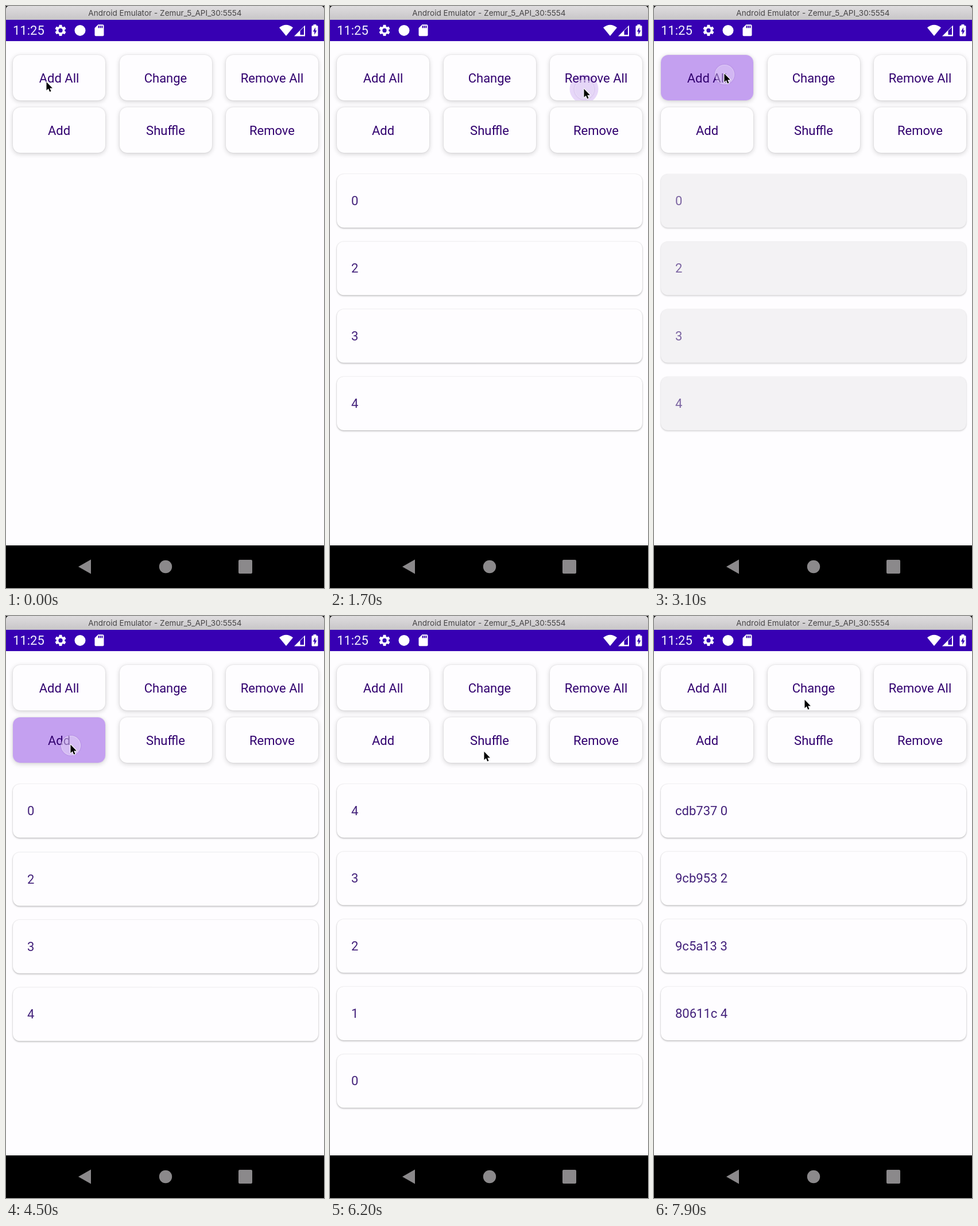
Animation of 554x1011 px, one loop 8000 ms. Source, as an HTML page:

```html
<!DOCTYPE html>
<html lang="en">
<head>
<meta charset="utf-8">
<title>List animations</title>
<style>
html, body { margin: 0; width: 100%; height: 100%; overflow: hidden; background: #000; }
#stage { position: relative; width: 554px; height: 1011px; overflow: hidden; background: #000; font: 22px Roboto, sans-serif; }
#stage > * { position: absolute; }
#title { left: 0; top: 0; width: 554px; height: 24px; border-radius: 5px 5px 0 0; background: linear-gradient(#dedcde, #c8c6c8);
  font: 13.6px/25px Inter, sans-serif; color: #464446; text-align: center; white-space: nowrap; }
#status { left: 0; top: 23.5px; width: 554px; height: 37.5px; background: #3700b3; }
#clock { left: 12px; top: 23px; line-height: 40px; color: #f3effc; }
#page { left: 0; top: 61px; width: 554px; height: 876px; background: #fefdff; }
#icons, #pointer { left: 0; top: 0; }
.button { width: 161px; height: 79px; border-radius: 13px; background: #fefdff; overflow: hidden; color: #31006f;
  text-align: center; line-height: 82px; box-shadow: 0 2px 9px rgba(0,0,0,.18), 0 0 2px rgba(0,0,0,.13); }
.button span { position: relative; }
.ripple { position: absolute; inset: 0; background: #c4a0f0; opacity: 0; }
.card { left: 12px; top: 292px; width: 532px; height: 92.5px; border-radius: 12px; line-height: 94.5px; color: #42207a; }
.card span { position: absolute; left: 25px; white-space: pre; }
#dot { width: 32px; height: 32px; margin: -17px; border-radius: 50%; background: rgba(228,214,246,.55);
  border: 1px solid rgba(240,230,250,.6); box-shadow: 0 0 3px rgba(70,30,110,.22); }
</style>
</head>
<body>
<div id="stage">
  <div id="page"></div>
  <div id="title">Android Emulator - Zemur_5_API_30:5554</div>
  <div id="status"></div>
  <div id="clock">11:25</div>
  <svg id="icons" width="554" height="1011" fill="#fff">
    <path transform="translate(83 30.4)" d="M19.14 12.94c.04-.3.06-.61.06-.94 0-.32-.02-.64-.07-.94l2.03-1.58c.18-.14.23-.41.12-.61l-1.92-3.32c-.12-.22-.37-.29-.59-.22l-2.39.96c-.5-.38-1.03-.7-1.62-.94l-.36-2.54c-.04-.24-.24-.41-.48-.41h-3.84c-.24 0-.43.17-.47.41l-.36 2.54c-.59.24-1.13.57-1.62.94l-2.39-.96c-.22-.08-.47 0-.59.22L2.74 8.87c-.12.21-.08.47.12.61l2.03 1.58c-.05.3-.09.63-.09.94s.02.64.07.94l-2.03 1.58c-.18.14-.23.41-.12.61l1.92 3.32c.12.22.37.29.59.22l2.39-.96c.5.38 1.03.7 1.62.94l.36 2.54c.05.24.24.41.48.41h3.84c.24 0 .44-.17.47-.41l.36-2.54c.59-.24 1.13-.56 1.62-.94l2.39.96c.22.08.47 0 .59-.22l1.92-3.32c.12-.22.07-.47-.12-.61zM12 15.6A3.6 3.6 0 1 1 12 8.4a3.6 3.6 0 0 1 0 7.2z"/>
    <circle cx="129" cy="42.4" r="9.5"/>
    <path transform="translate(150.5 30.2)" d="M18 2h-8L4 8v12c0 1.1.9 2 2 2h12c1.1 0 2-.9 2-2V4c0-1.1-.9-2-2-2zm-6 6h-2V4h2zm3 0h-2V4h2zm3 0h-2V4h2z"/>
    <path d="M488 52L476 37.5Q488 28 500 37.5Z"/>
    <path d="M502 52.5L521 33.5V52.5Z"/>
    <path d="M512.5 43L519 36.5V50H512.5Z" fill="#3700b3"/>
    <path d="M535.5 32h5v2h1.5q1.5 0 1.5 1.5v15.5q0 1.5-1.5 1.5h-8q-1.5 0-1.5-1.5v-15.5q0-1.5 1.5-1.5h1.5z"/>
    <path d="M539 37L534.8 44.5H537.3V50L541.5 42.5H539Z" fill="#3700b3"/>
    <g fill="#8b898b">
      <path d="M126 974L148 961.5V986.5Z"/>
      <circle cx="278" cy="974" r="11.2"/>
      <rect x="405" y="962" width="24" height="24" rx="2"/>
    </g>
  </svg>
  <div id="dot"></div>
  <svg id="pointer" width="14" height="22" overflow="visible">
    <path d="M0 0V14.5L3.4 11.5L5.7 17L8 16L5.7 10.7H10.4Z" stroke="#fff" stroke-width="2" paint-order="stroke" stroke-linejoin="round"/>
  </svg>
</div>
<script>
const LOOP = 8000, FADE = 120, MOVE = 250, ROW = 117.33;
const $ = id => document.getElementById(id);
const clamp = v => Math.max(0, Math.min(1, v));
const span = (t, start, length) => clamp((t - start) / length);
const ease = p => .5 - .5 * Math.cos(Math.PI * p);
const mix = (a, b, p) => a + (b - a) * p;

function add(parent, tag, cls, text = '') {
  const el = document.createElement(tag);
  el.className = cls;
  el.textContent = text;
  return parent.appendChild(el);
}

// Pointer moves: start, end, x, y, upward bow
const moves = [
  [-1, 0, 70.5, 132, 0],
  [950, 1480, 442.5, 144, 103],
  [2250, 2800, 122.5, 117.5, 0],
  [3450, 3900, 112.5, 223.5, 0],
  [5250, 5600, 268.5, 235.5, 0],
  [6850, 7200, 262.5, 145.5, 0]
];
// Taps: time, button index
const taps = [[490, 0], [1680, 2], [2870, 0], [4290, 3], [5650, 4], [6290, 4], [7300, 1]];
// List updates: time, order of items, whether labels change
const updates = [
  [-1000, ''],
  [640, '0234'],
  [1830, ''],
  [3020, '0234'],
  [4485, '01234'],
  [5780, '43210'],
  [6430, '20413'],
  [7440, '0234', true]
];
const prefixes = ['cdb737', '', '9cb953', '9c5a13', '80611c'];

const stage = $('stage');
const buttons = ['Add All', 'Change', 'Remove All', 'Add', 'Shuffle', 'Remove'].map((label, i) => {
  const el = add(stage, 'div', 'button');
  const x = 12 + i % 3 * 185.5, y = i < 3 ? 85 : 176;
  el.style.left = x + 'px';
  el.style.top = y + 'px';
  const ripple = add(el, 'div', 'ripple');
  add(el, 'span', '', label);
  return { x, y, ripple };
});
const cards = prefixes.map((prefix, id) => {
  const el = add(stage, 'div', 'card');
  return { el, plain: add(el, 'span', '', id), changed: add(el, 'span', '', prefix + ' ' + id) };
});
stage.append($('dot'), $('pointer'));

function pointerAt(t) {
  let [, , x, y] = moves[0];
  for (const [start, end, nx, ny, bow] of moves) {
    if (t < start) break;
    const p = ease(span(t, start, end - start));
    x = mix(x, nx, p);
    y = mix(y, ny, p) - bow * Math.sin(Math.PI * p);
  }
  return [x, y];
}

function drawTaps(t, x, y) {
  let dot = 0;
  buttons.forEach(b => b.ripple.style.opacity = 0);
  for (const [time, index] of taps) {
    const e = t - time;
    if (e < 0 || e > 440) continue;
    const { ripple, x: bx, y: by } = buttons[index];
    const r = mix(20, 170, ease(span(e, 0, 180)));
    ripple.style.opacity = span(e, -10, 75) * (1 - span(e, 250, 190));
    ripple.style.clipPath = `circle(${r}px at ${x - bx}px ${y - by}px)`;
    dot = 1 - span(e, 200, 140);
  }
  $('dot').style.opacity = dot;
  $('dot').style.left = x + 'px';
  $('dot').style.top = y + 1 + 'px';
}

// Removals first, then moves and label changes, then insertions.
function drawCards(t) {
  const n = updates.findLastIndex(u => t >= u[0]);
  const [time, now, relabel] = updates[n];
  const before = n ? updates[n - 1][1] : '';
  const e = t - time;
  const ids = [0, 1, 2, 3, 4];
  const from = id => before.indexOf(id), to = id => now.indexOf(id);
  const wait = ids.some(id => from(id) >= 0 && to(id) < 0) ? FADE : 0;
  const shifts = ids.some(id => from(id) >= 0 && to(id) >= 0 && from(id) !== to(id));
  const p = span(e, wait, MOVE);

  cards.forEach(({ el, plain, changed }, id) => {
    const a = from(id), b = to(id);
    let alpha = 1, row = b;
    if (a < 0 && b < 0) alpha = 0;
    else if (a < 0) alpha = span(e, wait + (shifts ? MOVE : 0), FADE);
    else if (b < 0) { alpha = 1 - span(e, 0, FADE); row = a; }
    else row = mix(a, b, ease(p));

    const swap = relabel && b >= 0 ? p : 0;
    // The shadow shows through a half-transparent card.
    const shade = 52 * Math.max(alpha * (1 - alpha), swap * (1 - swap));
    el.style.visibility = alpha ? 'visible' : 'hidden';
    el.style.transform = `translateY(${row * ROW}px)`;
    el.style.background = `rgb(${254 - shade},${253 - shade},${255 - shade})`;
    el.style.boxShadow = `0 1.5px 3px rgba(0,0,0,${.24 * alpha}), 0 0 2px rgba(0,0,0,${.13 * alpha})`;
    plain.style.opacity = alpha * (1 - swap);
    changed.style.opacity = alpha * swap;
  });
}

function draw(t) {
  const [x, y] = pointerAt(t);
  $('pointer').style.transform = `translate(${x}px,${y}px)`;
  drawTaps(t, x, y);
  drawCards(t);
}

const begin = performance.now();
function tick() {
  draw((performance.now() - begin) % LOOP);
  requestAnimationFrame(tick);
}
tick();
</script>
</body>
</html>
```
